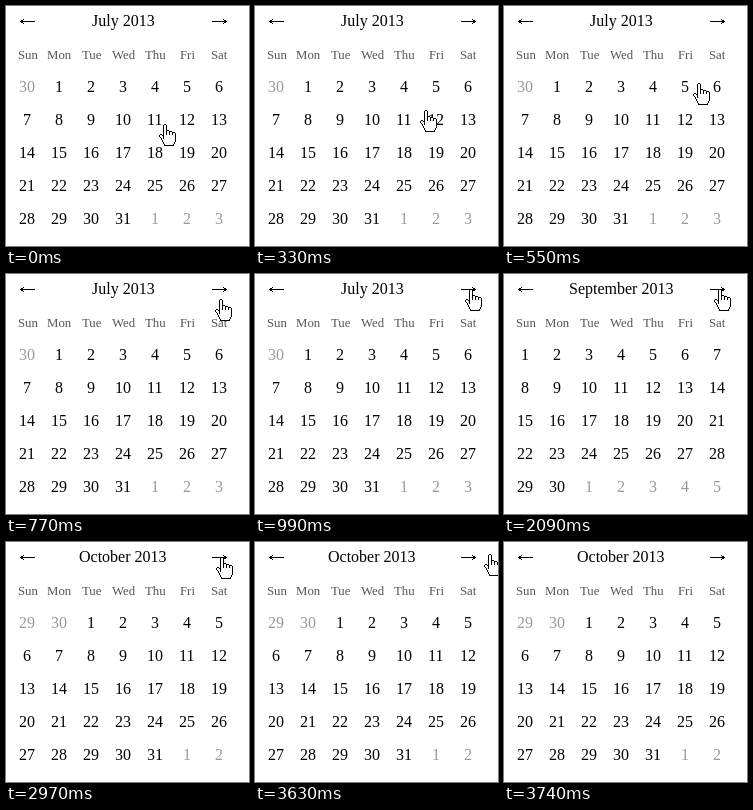
These frames come from a looping animation (243x240 px, 4.4 s). An HTML page with a canvas:

```html
<!DOCTYPE html>
<html lang="en">
<head>
<meta charset="utf-8">
<title>Calendar</title>
<style>
  html, body { margin: 0; width: 100%; height: 100%; overflow: hidden; background: #fff; }
  canvas { display: block; }
</style>
</head>
<body>
<canvas id="stage" width="243" height="240"></canvas>
<script>
const ctx = document.getElementById('stage').getContext('2d');
const LOOP = 4400;
const TICK = 110;
const YEAR = 2013;
const JULY = 6;
const CLICKS = [1430, 2090, 2970];
const WEEKDAYS = ['Sun', 'Mon', 'Tue', 'Wed', 'Thu', 'Fri', 'Sat'];

const PATH = [
  { at: 220, x: 153, y: 118 },
  { at: 550, x: 189, y: 77 },
  { at: 770, x: 209, y: 25 },
  { at: 990, x: 210, y: 15 },
  { at: 3520, x: 210, y: 15 },
  { at: 3740, x: 248, y: 9 }
];
const PALM = [
  [4, 10], [4, 14], [4, 11], [3, 11], [2, 10], [1, 10], [0, 11],
  [0, 12], [2, 14], [5, 21], [14, 21], [16, 16], [16, 10]
];

const columnX = column => 21 + column * 32;

function label(text, center, baseline, color = '#000', size = 16) {
  ctx.font = `${size}px "Liberation Serif", "Times New Roman", serif`;
  ctx.fillStyle = color;
  ctx.fillText(text, Math.round(center - ctx.measureText(text).width / 2), baseline);
}

// Crisp one-pixel line.
function pixelLine([x0, y0], [x1, y1]) {
  const count = Math.max(Math.abs(x1 - x0), Math.abs(y1 - y0));
  for (let i = 0; i <= count; i++) {
    const part = i / count;
    ctx.fillRect(Math.round(x0 + (x1 - x0) * part), Math.round(y0 + (y1 - y0) * part), 1, 1);
  }
}

function outlined(points) {
  ctx.fillStyle = '#fff';
  ctx.beginPath();
  points.forEach(([x, y]) => ctx.lineTo(x + 0.5, y + 0.5));
  ctx.fill();
  ctx.fillStyle = '#000';
  points.slice(1).forEach((point, i) => pixelLine(points[i], point));
}

function drawHand(x, y) {
  ctx.save();
  ctx.translate(x, y);
  outlined(PALM);
  for (let finger = 0; finger < 4; finger++) {
    const left = 4 + 3 * finger;
    const top = finger && 5 + finger;
    outlined([
      [left, 10], [left, top + 1], [left + 1, top],
      [left + 2, top], [left + 3, top + 1], [left + 3, 10]
    ]);
  }
  ctx.restore();
}

// The pointer position is sampled once per tick.
function drawPointer(time) {
  const now = Math.floor(time / TICK) * TICK;
  const next = PATH.findIndex(point => point.at > now);
  if (next < 0) return;
  const to = PATH[next];
  const from = PATH[Math.max(0, next - 1)];
  const part = next ? (now - from.at) / (to.at - from.at) : 0;
  const mix = key => Math.round(from[key] + (to[key] - from[key]) * part);
  drawHand(mix('x'), mix('y'));
}

function drawArrow(center, direction) {
  const tip = center + 7 * direction;
  const barb = tip - 3 * direction;
  ctx.fillStyle = '#000';
  pixelLine([center - 7 * direction, 15], [tip, 15]);
  pixelLine([tip, 15], [barb, 13]);
  pixelLine([tip, 15], [barb, 17]);
}

function drawCalendar(month) {
  const first = new Date(YEAR, month, 1);
  label(`${first.toLocaleString('en-US', { month: 'long' })} ${YEAR}`, 117, 20);
  drawArrow(21, -1);
  drawArrow(213, 1);
  WEEKDAYS.forEach((day, column) => label(day, columnX(column) + 0.5, 53, '#555', 12.8));

  for (let cell = 0; cell < 35; cell++) {
    const date = new Date(YEAR, month, 1 + cell - first.getDay());
    const color = date.getMonth() === month ? '#000' : '#999';
    label(String(date.getDate()), columnX(cell % 7), 86 + 33 * Math.floor(cell / 7), color);
  }
}

const start = performance.now();

function draw() {
  const time = (performance.now() - start) % LOOP;
  ctx.fillStyle = '#fff';
  ctx.fillRect(0, 0, 243, 240);
  drawCalendar(JULY + CLICKS.filter(click => click <= time).length);
  drawPointer(time);
  requestAnimationFrame(draw);
}
draw();
</script>
</body>
</html>
```
